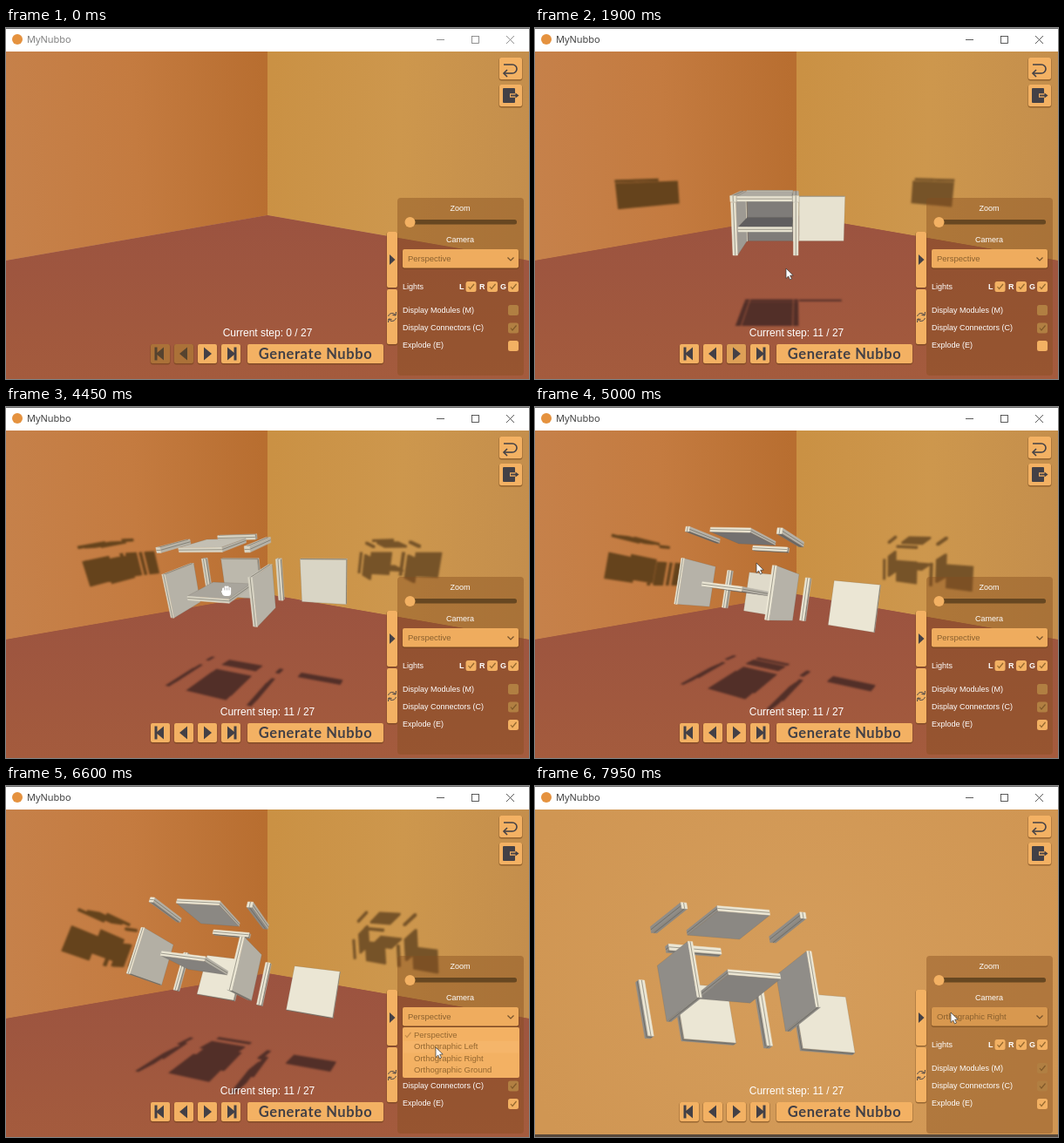
These frames come from a looping animation (600 px wide and 403 px high, 8000 ms). An HTML page with a canvas:

```html
<!DOCTYPE html>
<html lang="en">
<head>
<meta charset="utf-8">
<title>MyNubbo</title>
<style>
  html, body { margin: 0; width: 100%; height: 100%; overflow: hidden; }
  canvas { display: block; }
</style>
</head>
<body>
<canvas id="stage" width="600" height="403"></canvas>
<script>
const ctx = document.getElementById('stage').getContext('2d');
const LOOP = 8000, FOCAL = 326, CX = 300, CY = 215, ZOOM = 1.25, CELL = 32;
const SANS = '"Liberation Sans", Arial, sans-serif';
const AMBER = '#f3b163', INK = '#434046', DIM = '#b17f42', BROWN = '#94682f';

// Times of the hard changes
const EXPLODE = 4100, ORTHO_LEFT = 6900, ORTHO_RIGHT = 7500;
const stepAt = t => Math.max(0, Math.min(11, Math.floor((t - 120) / 130)));
const menuOpen = t => (t > 6280 && t < 6960) || (t > 7180 && t < 7560);
const dragging = t => (t > 2050 && t < 2800) || (t > 4400 && t < 4980) || (t > 5200 && t < 5800);

// time, yaw, pitch, roll, screen position of the shelf
const POSES = [
  [2050, 0, 10, 0, 267, 225], [2800, -24, 21, 4, 274, 217],
  [EXPLODE, -24, 21, 4, 274, 217], [4450, -24, 19, 5, 246, 212],
  [5000, -25, -2, -8, 231, 209], [5200, -25, -2, -8, 231, 209],
  [5800, -20, -12, -12, 218, 204]
];
const LEFT_POSE = [-58, -7, -24, 269, 238], RIGHT_POSE = [34, -22, 9.5, 234, 230];
const PIVOT = [32, 16, -6];
const POINTER = [
  [60, 300, 310], [200, 231, 376], [1680, 231, 376], [1900, 288, 276], [2050, 288, 276],
  [2800, 262, 296], [3300, 577, 369], [4120, 577, 369], [4400, 253, 206], [5000, 254, 179],
  [5200, 254, 179], [5800, 240, 158], [6200, 520, 262], [6320, 520, 262], [6600, 493, 300],
  [6920, 493, 300], [7120, 520, 262], [7200, 520, 262], [7400, 500, 312], [7520, 500, 312],
  [7900, 477, 260]
];

// Centres in cells and sizes of the parts, in building order
const P = 56;
const PARTS = [
  { at: [0, 0, -1], size: [P, P, 5], inner: true },
  { at: [-1, 0, -1], size: [6, P, 6] },
  { at: [-1, 0, 0], size: [5, P, P] },
  { at: [1, 0, -1], size: [6, P, 6] },
  { at: [1, 0, 0], size: [5, P, P] },
  { at: [0, 0, 0], size: [P, 5, P], inner: true },
  { at: [-1, 1, 0], size: [6, 6, P] },
  { at: [0, 1, -1], size: [P, 6, 6] },
  { at: [1, 1, 0], size: [6, 6, P] },
  { at: [0, 1, 0], size: [P, 5, P] },
  { at: [2, 0, -1], size: [P, P, 5] }
];

// Light directions in camera space (left, right, ground);
// each light hits one plane through the room corner
const TILT = Math.PI / 18, SQ = Math.SQRT1_2, CORNER = [0, 0, -1008];
const ROOM_LIGHTS = [
  [-SQ, SQ * Math.sin(TILT), -SQ * Math.cos(TILT)],
  [SQ, SQ * Math.sin(TILT), -SQ * Math.cos(TILT)],
  [0, -Math.cos(TILT), -Math.sin(TILT)]
];
const LEFT_LIGHTS = [[0, 0, -1], [1, 0, 0], [0, -1, 0]];
const RIGHT_LIGHTS = [[-1, 0, 0], [0, 0, -1], [0, -1, 0]];
const POWER = [.44, .44, .38], AMBIENT = .36;
const SHADES = ['#65431c', '#765328', '#522f28'];

const smooth = u => { u = Math.max(0, Math.min(1, u)); return u * u * (3 - 2 * u); };
const dot = (a, b) => a[0] * b[0] + a[1] * b[1] + a[2] * b[2];

function sample(keys, t) {
  if (t <= keys[0][0]) return keys[0].slice(1);
  const i = keys.findIndex(k => k[0] > t);
  if (i < 0) return keys[keys.length - 1].slice(1);
  const from = keys[i - 1], to = keys[i], u = smooth((t - from[0]) / (to[0] - from[0]));
  return from.slice(1).map((v, j) => v + (to[j + 1] - v) * u);
}

function rotation(...degrees) {
  const [[ca, sa], [cb, sb], [cc, sc]] = degrees.map(d => [Math.cos(d * Math.PI / 180), Math.sin(d * Math.PI / 180)]);
  return ([x, y, z]) => {
    [x, z] = [x * ca + z * sa, z * ca - x * sa];
    [y, z] = [y * cb - z * sb, y * sb + z * cb];
    return [x * cc - y * sc, x * sc + y * cc, z];
  };
}

// ---- Drawing helpers ----
function box(x, y, w, h, fill, r = 2) {
  ctx.fillStyle = fill;
  ctx.beginPath();
  ctx.roundRect(x, y, w, h, r);
  ctx.fill();
}
function trace(points, close) {
  ctx.beginPath();
  points.forEach(p => ctx.lineTo(p[0], p[1]));
  if (close) ctx.closePath();
}
function poly(points, fill) {
  trace(points, true);
  ctx.fillStyle = fill;
  ctx.fill();
}
function line(points, color, width = 1) {
  trace(points);
  ctx.strokeStyle = color;
  ctx.lineWidth = width;
  ctx.stroke();
}
function disc(x, y, r, fill) {
  ctx.fillStyle = fill;
  ctx.beginPath();
  ctx.arc(x, y, r, 0, 7);
  ctx.fill();
}
function label(str, x, y, size = 9, color = '#fff', align = 'left', font = SANS, weight = '') {
  ctx.font = `${weight} ${size}px ${font}`;
  ctx.textAlign = align;
  ctx.textBaseline = 'middle';
  ctx.fillStyle = color;
  ctx.fillText(str, x, y);
}
function gradient(x0, y0, x1, y1, ...colors) {
  const g = ctx.createLinearGradient(x0, y0, x1, y1);
  colors.forEach((c, i) => g.addColorStop(i / (colors.length - 1), c));
  return g;
}

// ---- Scene ----
function room(t) {
  if (t >= ORTHO_LEFT) {
    const g = ctx.createRadialGradient(300, 215, 40, 300, 215, 330);
    const right = t >= ORTHO_RIGHT;
    g.addColorStop(0, right ? '#d49c5a' : '#c98445');
    g.addColorStop(1, right ? '#d09653' : '#c37d3f');
    box(0, 27, 600, 376, g, 0);
    box(0, 400, 600, 3, '#57483a', 0);
    return;
  }
  poly([[0, 27], [300, 27], [300, 215], [0, 267]], gradient(0, 150, 300, 130, '#c6814a', '#c47b40', '#b86e30'));
  poly([[300, 27], [600, 27], [600, 267], [300, 215]], gradient(300, 130, 600, 150, '#ca9144', '#cd974d', '#c48e4c'));
  poly([[0, 267], [300, 215], [600, 267], [600, 403], [0, 403]], gradient(0, 215, 0, 403, '#9b5340', '#a45b3d'));
}

function faces(part) {
  const list = [];
  for (let axis = 0; axis < 3; axis++) for (const sign of [1, -1]) {
    const u = (axis + 1) % 3, v = (axis + 2) % 3;
    const corners = [[-1, -1], [1, -1], [1, 1], [-1, 1]].map(([a, b]) => {
      const p = [0, 0, 0];
      p[axis] = sign * part.size[axis] / 2;
      p[u] = a * part.size[u] / 2;
      p[v] = b * part.size[v] / 2;
      return p;
    });
    const normal = [0, 0, 0];
    normal[axis] = sign;
    list.push({ normal, corners: sign > 0 ? corners : corners.reverse(), thin: Math.min(part.size[u], part.size[v]) < 8 });
  }
  return list;
}
PARTS.forEach(part => part.faces = faces(part));

const facesViewer = q => (q[2][0] - q[0][0]) * (q[3][1] - q[1][1]) < (q[2][1] - q[0][1]) * (q[3][0] - q[1][0]);
const middle = (a, b) => [(a[0] + b[0]) / 2, (a[1] + b[1]) / 2];
const span = (a, b) => Math.hypot(a[0] - b[0], a[1] - b[1], a[2] - b[2]);

function shadows(solids, project) {
  ctx.filter = 'blur(1.1px)';
  ROOM_LIGHTS.forEach((dir, light) => {
    ctx.beginPath();
    for (const face of solids.flatMap(s => s.faces)) {
      const quad = face.world.map(p => {
        const reach = dot(CORNER, dir) - dot(p, dir);
        return project(p.map((v, i) => v + dir[i] * reach));
      });
      if (!facesViewer(quad)) continue;
      quad.forEach((q, i) => i ? ctx.lineTo(...q) : ctx.moveTo(...q));
      ctx.closePath();
    }
    ctx.fillStyle = SHADES[light];
    ctx.fill();
  });
  ctx.filter = 'none';
}

function furniture(t) {
  const ortho = t >= ORTHO_LEFT;
  const [yaw, pitch, roll, sx, sy] = !ortho ? sample(POSES, t) : t < ORTHO_RIGHT ? LEFT_POSE : RIGHT_POSE;
  const lights = !ortho ? ROOM_LIGHTS : t < ORTHO_RIGHT ? LEFT_LIGHTS : RIGHT_LIGHTS;
  const turn = rotation(yaw, pitch, roll);
  const spread = 1 + smooth((t - EXPLODE) / 500);
  const depth = FOCAL + spread * turn(PIVOT)[2];
  const scale = ortho ? ZOOM : FOCAL / depth;
  const origin = [(sx - CX) / scale, (CY - sy) / scale, -depth];
  const project = p => {
    const s = ortho ? ZOOM : FOCAL / -p[2];
    return [CX + p[0] * s, CY - p[1] * s];
  };

  const solids = PARTS.slice(0, stepAt(t)).map(part => {
    const place = p => turn(p.map((v, i) => v + part.at[i] * CELL * spread)).map((v, i) => v + origin[i]);
    const centre = place([0, 0, 0]);
    return {
      inner: part.inner,
      far: ortho ? -centre[2] : Math.hypot(...centre),
      faces: part.faces.map(f => ({ ...f, world: f.corners.map(place), normal: turn(f.normal) }))
    };
  }).sort((a, b) => b.far - a.far);

  if (!ortho) shadows(solids, project);

  for (const solid of solids) for (const face of solid.faces) {
    const quad = face.world.map(project);
    if (!facesViewer(quad)) continue;
    let light = lights.reduce((sum, dir, i) => sum + POWER[i] * Math.max(0, -dot(face.normal, dir)), AMBIENT);
    if (solid.inner && !face.thin) light *= .55 + .4 * (spread - 1);
    light = Math.min(1, light);
    const fill = `rgb(${235 * light}, ${230 * light}, ${198 * light + 14})`;
    poly(quad, fill);
    trace(quad, true);
    ctx.strokeStyle = face.thin ? fill : 'rgba(95,90,75,.35)';
    ctx.lineWidth = .5;
    ctx.stroke();
    if (face.thin) {
      const along = span(face.world[0], face.world[1]) > span(face.world[1], face.world[2]) ? 1 : 0;
      line([middle(quad[along], quad[along + 1]), middle(quad[(along + 2) % 4], quad[(along + 3) % 4])], 'rgba(85,82,72,.5)', 1);
    }
  }
}

// ---- Interface ----
function titleBar(t) {
  const ink = t < 50 ? '#777' : '#333';
  box(0, 0, 600, 27, '#fff', 0);
  box(0, 0, 600, 1, '#666', 0);
  disc(13, 13, 6, '#e5923f');
  label('MyNubbo', 24, 14, 11, ink, 'left', '"Open Sans", sans-serif');
  line([[494, 13.5], [503, 13.5]], ink, .8);
  ctx.strokeRect(534.5, 9.5, 8, 8);
  line([[574, 9], [583, 18]], ink, .8);
  line([[583, 9], [574, 18]], ink, .8);
}

function button(x, y, w, h, fill = AMBER) {
  box(x - .5, y, w + 1, h + 1.5, 'rgba(105,62,22,.55)', 3);
  box(x, y, w, h, fill, 2);
}

function cornerButtons() {
  button(566, 34, 26, 25);
  line([[571, 52], [581, 52]], INK, 1.6);
  ctx.beginPath();
  ctx.arc(581, 47, 5, Math.PI / 2, -Math.PI / 2, true);
  ctx.lineTo(571, 42);
  ctx.stroke();
  line([[575, 48], [571, 52], [575, 56]], INK, 1.6);
  button(566, 65, 26, 25);
  box(570, 69, 14, 17, INK, 1);
  line([[578, 77.5], [584, 77.5]], AMBER, 4.5);
  line([[579, 77.5], [586, 77.5]], INK, 1.8);
  poly([[584.5, 74.5], [588.5, 77.5], [584.5, 80.5]], INK);
}

function playback(t) {
  const step = stepAt(t);
  label(`Current step: ${step} / 27`, 300, 350.5, 12, '#fff', 'center');
  [166, 193, 220, 247].forEach((x, i) => {
    const off = i < 2 && step === 0, hover = i === 2 && t > 200 && t < 1950;
    button(x, 363, 22, 22, off ? '#ab7138' : hover ? '#dda057' : AMBER);
    const c = x + 11, d = i < 2 ? 1 : -1;
    const ink = off ? '#55432f' : INK;
    poly([[c - 5 * d, 374], [c + 4 * d, 366.5], [c + 4 * d, 381.5]], ink);
    if (i % 3 === 0) box(c - 5 * d - 1.5, 366.5, 3, 15, ink, 0);
  });
  button(277, 363, 156, 22);
  ctx.letterSpacing = '.6px';
  label('Generate Nubbo', 355, 375, 16.5, INK, 'center', 'Lato, sans-serif', 'bold');
  ctx.letterSpacing = '0px';
}

function check(x, y, color = BROWN) {
  line([[x - 3, y], [x - 1, y + 2.5], [x + 3.5, y - 3]], color, 1.2);
}
function checkbox(x, y, on, active = true) {
  box(x - 6, y - 6, 12, 12, active ? AMBER : DIM, 2.5);
  if (on) check(x, y, active ? BROWN : '#80592a');
}

function panel(t) {
  const ortho = t >= ORTHO_LEFT, exploded = t >= EXPLODE;
  button(437, 234, 12, 64);
  poly([[440, 260], [446.5, 266], [440, 272]], INK);
  button(437, 300, 12, 63);
  ctx.strokeStyle = INK;
  ctx.lineWidth = 1;
  for (const start of [.25, Math.PI + .25]) {
    ctx.beginPath();
    ctx.arc(443, 332, 4.5, start, start + 2.4);
    ctx.stroke();
  }
  line([[447.5, 326], [447, 330], [443.5, 329.5]], INK);
  line([[438.5, 338], [439, 334], [442.5, 334.5]], INK);

  box(449, 195, 145, 204, 'rgba(132,78,32,.43)', 4);
  label('Zoom', 521, 208, 9, '#fff', 'center');
  box(459, 220, 127, 5.5, '#674721', 2.5);
  disc(463.5, 223, 6, AMBER);
  label('Camera', 521, 244, 9, '#fff', 'center');
  button(455, 254, 133, 21.5, ortho ? '#d8984f' : '#efac5e');
  const view = !ortho ? 'Perspective' : t < ORTHO_RIGHT ? 'Orthographic Left' : 'Orthographic Right';
  label(view, 461, 265.5, 9.5, '#89602f');
  line([[575.5, 263.5], [579, 267], [582.5, 263.5]], '#75522c', 1.2);

  label('Lights', 455, 297.5);
  [['L', 520], ['R', 543], ['G', 567]].forEach(([name, x], i) => {
    label(name, x, 297.5, 9, '#fff', 'left', SANS, 'bold');
    checkbox([533.5, 558, 582][i], 297, true);
  });
  label('Display Modules (M)', 455, 324.5);
  checkbox(582, 324, ortho, false);
  label('Display Connectors (C)', 455, 345);
  checkbox(582, 344.5, true, false);
  label('Explode (E)', 455, 365);
  checkbox(582, 365, exploded);

  if (menuOpen(t)) menu(t);
}

function menu(t) {
  box(455, 277, 134, 58, AMBER, 2);
  const pointerY = sample(POINTER, t)[1];
  ['Perspective', 'Orthographic Left', 'Orthographic Right', 'Orthographic Ground'].forEach((name, i) => {
    const y = 286 + i * 13.6;
    if (Math.abs(pointerY - y) < 6.8) box(456, y - 6.8, 132, 13.6, '#f5b56a', 0);
    label(name, 468, y, 9.5, '#946730');
    if (i === (t < ORTHO_LEFT ? 0 : t < ORTHO_RIGHT ? 1 : 2)) check(461, y, '#c48b4a');
  });
}

function pointer(t) {
  if (t < 60) return;
  const [x, y] = sample(POINTER, t);
  ctx.save();
  ctx.translate(x, y);
  if (dragging(t)) {
    [-4, -1.5, 1, 3.5].forEach((dx, i) => box(dx - 1, [2, 0, 0, 1.5][i], 2.6, 8, '#fff', 1.3));
    box(-4.5, 4.5, 9.5, 7, '#fff', 3);
    box(-6, 5, 4, 3, '#fff', 1.5);
    for (const dx of [-2, .5, 3]) line([[dx, 2], [dx, 5]], '#777', .5);
  } else {
    const shape = [[0, 0], [0, 11.5], [2.7, 9], [4.5, 13], [6.5, 12], [4.7, 8.2], [8.2, 8]];
    poly(shape, '#fff');
    trace(shape, true);
    ctx.strokeStyle = '#333';
    ctx.lineWidth = .7;
    ctx.stroke();
  }
  ctx.restore();
}

function draw(now) {
  const t = now % LOOP;
  room(t);
  furniture(t);
  titleBar(t);
  cornerButtons();
  playback(t);
  panel(t);
  pointer(t);
}

const start = performance.now();
function tick() {
  draw(performance.now() - start);
  requestAnimationFrame(tick);
}
tick();
</script>
</body>
</html>
```
